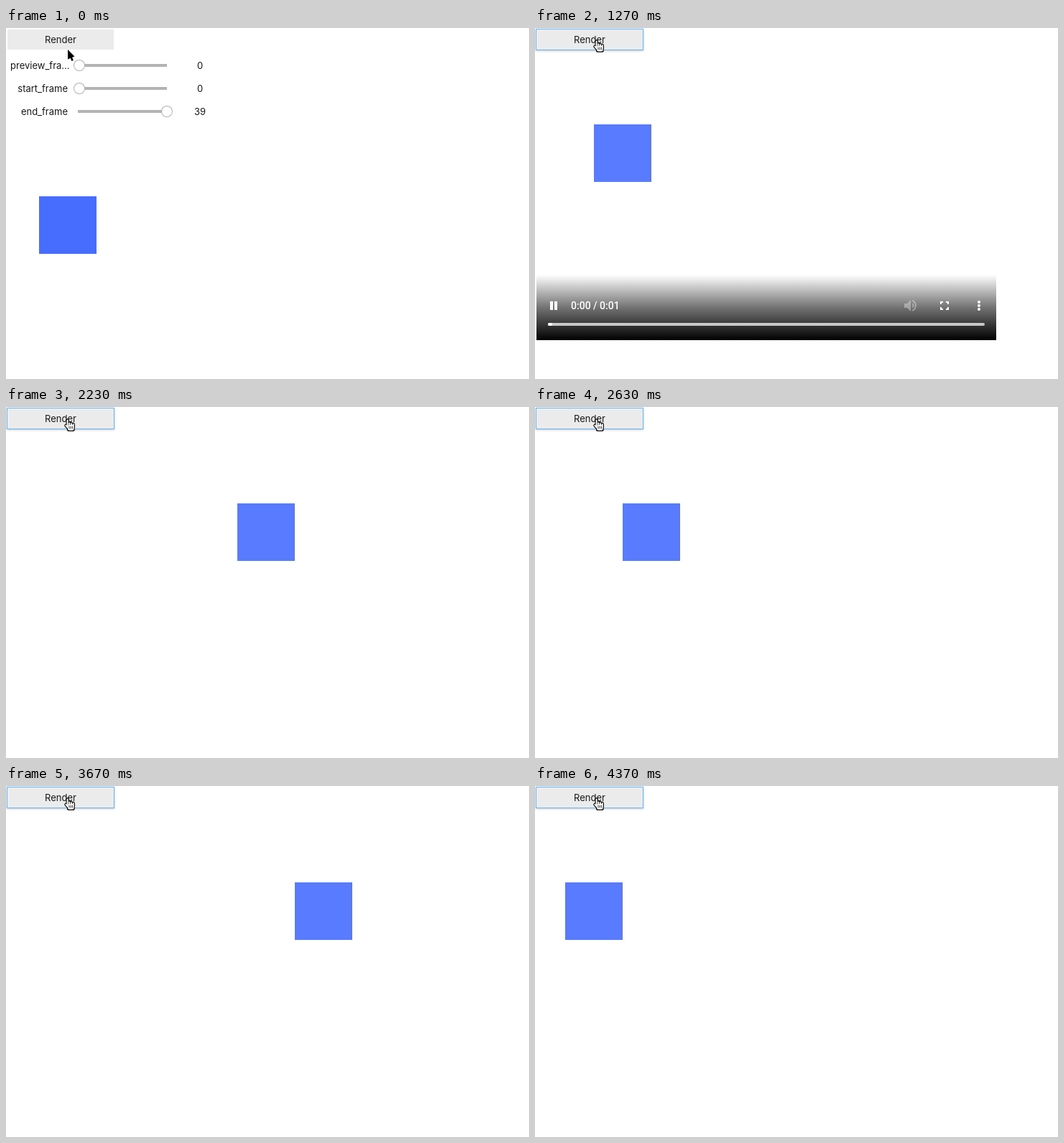
These frames come from a looping animation (728x488 px, 4410 ms). An HTML page with a canvas:

```html
<!DOCTYPE html>
<html lang="en">
<head>
<meta charset="utf-8">
<title>Render preview</title>
<style>
  html, body { margin: 0; width: 100%; height: 100%; overflow: hidden; background: #fff; }
  canvas { display: block; width: 728px; height: 488px; }
</style>
</head>
<body>
<canvas id="stage" width="728" height="488"></canvas>
<script>
const ctx = document.getElementById('stage').getContext('2d');
const LOOP = 4410, TICK = 100 / 3;
const MOVE = 430, MOVE_END = 730, FOCUS = 870, PLAY = 1165, FADE = 1691;
const UI_FONT = '13px Inter, sans-serif';

const clamp = v => Math.min(1, Math.max(0, v));

function rect(color, x, y, w, h) {
  ctx.fillStyle = color;
  ctx.fillRect(x, y, w, h);
}

function pill(color, x, y, w, h, r) {
  ctx.fillStyle = color;
  ctx.beginPath();
  ctx.roundRect(x, y, w, h, r);
  ctx.fill();
}

function line(color, width, x1, y1, x2, y2) {
  ctx.strokeStyle = color;
  ctx.lineWidth = width;
  ctx.beginPath();
  ctx.moveTo(x1, y1);
  ctx.lineTo(x2, y2);
  ctx.stroke();
}

function disc(color, x, y, r) {
  ctx.fillStyle = color;
  ctx.beginPath();
  ctx.arc(x, y, r, 0, Math.PI * 2);
  ctx.fill();
}

function label(str, x, y, align, font = UI_FONT, color = '#181818') {
  ctx.font = font;
  ctx.fillStyle = color;
  ctx.textAlign = align;
  ctx.fillText(str, x, y);
}

// CSS "ease" solved by bisection
function ease(x) {
  const bez = (a, b, s) => 3 * a * s * (1 - s) ** 2 + 3 * b * s * s * (1 - s) + s ** 3;
  let lo = 0, hi = 1;
  for (let i = 0; i < 24; i++) {
    const mid = (lo + hi) / 2;
    if (bez(.25, .25, mid) < x) lo = mid; else hi = mid;
  }
  return bez(.1, 1, lo);
}

function button(hover, focus) {
  ctx.save();
  if (hover) {
    ctx.shadowColor = 'rgba(0,0,0,.22)';
    ctx.shadowBlur = 3;
    ctx.shadowOffsetY = 1;
  }
  if (focus) rect('#64b5f6', 1, 1, 150, 30);
  else pill('#ebebeb', 2, 2, 148, 28, 1);
  ctx.restore();
  if (focus) rect('#ebebeb', 2, 2, 148, 28);
  label('Render', 76, 21, 'center');
}

function slider(name, y, value, knobX) {
  const cut = name.endsWith('...');
  label(name, cut ? 6 : 86, y + 5, cut ? 'left' : 'right');
  rect('#b3b3b3', 100, y - 2, 124, 4);
  disc('#b0b0b0', knobX, y, 8);
  disc('#fff', knobX, y, 7);
  label(value, 270, y + 5, 'center');
}

// Cursors are drawn twice: a wide outline, then the body
function arrow(x, y) {
  ctx.save();
  ctx.translate(x, y);
  ctx.lineJoin = 'round';
  for (const [color, grow] of [['#fff', 2], ['#000', 0]]) {
    line(color, 2.6 + grow, 4, 9, 6.6, 15.4);
    ctx.beginPath();
    ctx.moveTo(0, 0);
    ctx.lineTo(0, 13.5);
    ctx.lineTo(9.4, 9.6);
    ctx.closePath();
    ctx.fillStyle = color;
    ctx.fill();
    if (grow) ctx.lineWidth = grow, ctx.stroke();
  }
  ctx.restore();
}

function hand(x, y) {
  ctx.save();
  ctx.translate(x, y);
  ctx.lineCap = 'round';
  for (const [color, grow] of [['#000', 1.1], ['#fff', 0]]) {
    line(color, 2 + 2 * grow, 2.4, 9.8, 6, 13.5);
    for (let i = 0; i < 4; i++) {
      const fx = 4.6 + 2.7 * i;
      line(color, 2 + 2 * grow, fx, i ? 5.8 + .7 * i : 2.4, fx, 12);
    }
    pill(color, 5 - grow, 9 - grow, 8.6 + 2 * grow, 7.6 + 2 * grow, 2);
  }
  for (let i = 0; i < 3; i++) line('#000', .8, 7 + 2.3 * i, 11, 7 + 2.3 * i, 14);
  ctx.restore();
}

function volumeIcon() {
  ctx.save();
  ctx.globalAlpha *= .35;
  rect('#fff', 514, 383, 4, 6);
  ctx.beginPath();
  ctx.moveTo(518, 383);
  ctx.lineTo(523, 378);
  ctx.lineTo(523, 394);
  ctx.lineTo(518, 389);
  ctx.fill();
  ctx.beginPath();
  ctx.arc(523.5, 386, 4, -1.1, 1.1);
  ctx.fill();
  ctx.lineWidth = 2;
  ctx.strokeStyle = '#fff';
  ctx.beginPath();
  ctx.arc(522.5, 386, 7.5, -1.2, 1.2);
  ctx.stroke();
  ctx.restore();
}

function fullscreenIcon() {
  for (const sx of [-1, 1]) for (const sy of [-1, 1]) {
    const x = 570 + sx * 5, y = 386 + sy * 5;
    line('#fff', 2, x - sx * 3, y, x + sx, y);
    line('#fff', 2, x, y - sy, x, y - sy * 3);
  }
}

function controls(alpha, progress) {
  const shade = ctx.createLinearGradient(0, 343, 0, 434);
  shade.addColorStop(0, 'rgba(0,0,0,0)');
  shade.addColorStop(.5, 'rgba(0,0,0,.55)');
  shade.addColorStop(1, '#000');
  ctx.save();
  ctx.globalAlpha = alpha;
  rect(shade, 2, 343, 640, 91);
  // The buttons fade inside the fading panel
  ctx.globalAlpha = alpha * alpha;
  for (const x of [21, 27]) rect('#fff', x, 380, 4, 12);
  label('0:00 / 0:01', 50, 391, 'left', '500 14px Roboto, sans-serif', '#fff');
  volumeIcon();
  fullscreenIcon();
  for (let i = -1; i <= 1; i++) disc('#fff', 618, 386 + 5 * i, 2);
  pill('rgba(255,255,255,.72)', 18, 410, 608, 4, 2);
  pill('#fff', 18, 410, Math.max(4, 608 * progress), 4, 2);
  ctx.restore();
}

function setup(t) {
  slider('preview_fra...', 52, '0', 102);
  slider('start_frame', 84, '0', 102);
  slider('end_frame', 116, '39', 224);
  rect('#476dff', 46, 234, 80, 80);
  const k = clamp((t - MOVE) / (MOVE_END - MOVE));
  const y = 30 - 14 * k * k * (3 - 2 * k);
  const hover = y < 29.5;
  button(hover, t >= FOCUS);
  if (hover) hand(81, y); else arrow(86, y);
}

function video(t) {
  const step = Math.max(0, Math.floor((t - 1183.7) / 39.75)) % 40;
  const x = 42 + 20 * (20 - Math.abs(20 - step));
  rect('#587bff', x, 134, 80, 80);
  rect('#7278a8', x + 79, 134, 1, 80);
  const alpha = 1 - ease(clamp((t - FADE) / 250));
  // The bar advances once every quarter second
  const played = t < 1265 ? 0 : 16 + 245 * Math.floor((t - 1265) / 250);
  if (alpha > 0) controls(alpha, played / 1600);
  button(true, true);
  hand(81, 16);
}

function draw() {
  const now = performance.now() % LOOP;
  const t = Math.floor((now + 5) / TICK) * TICK;
  rect('#fff', 0, 0, 728, 488);
  if (t < PLAY) setup(t); else video(t);
  requestAnimationFrame(draw);
}
draw();
</script>
</body>
</html>
```
